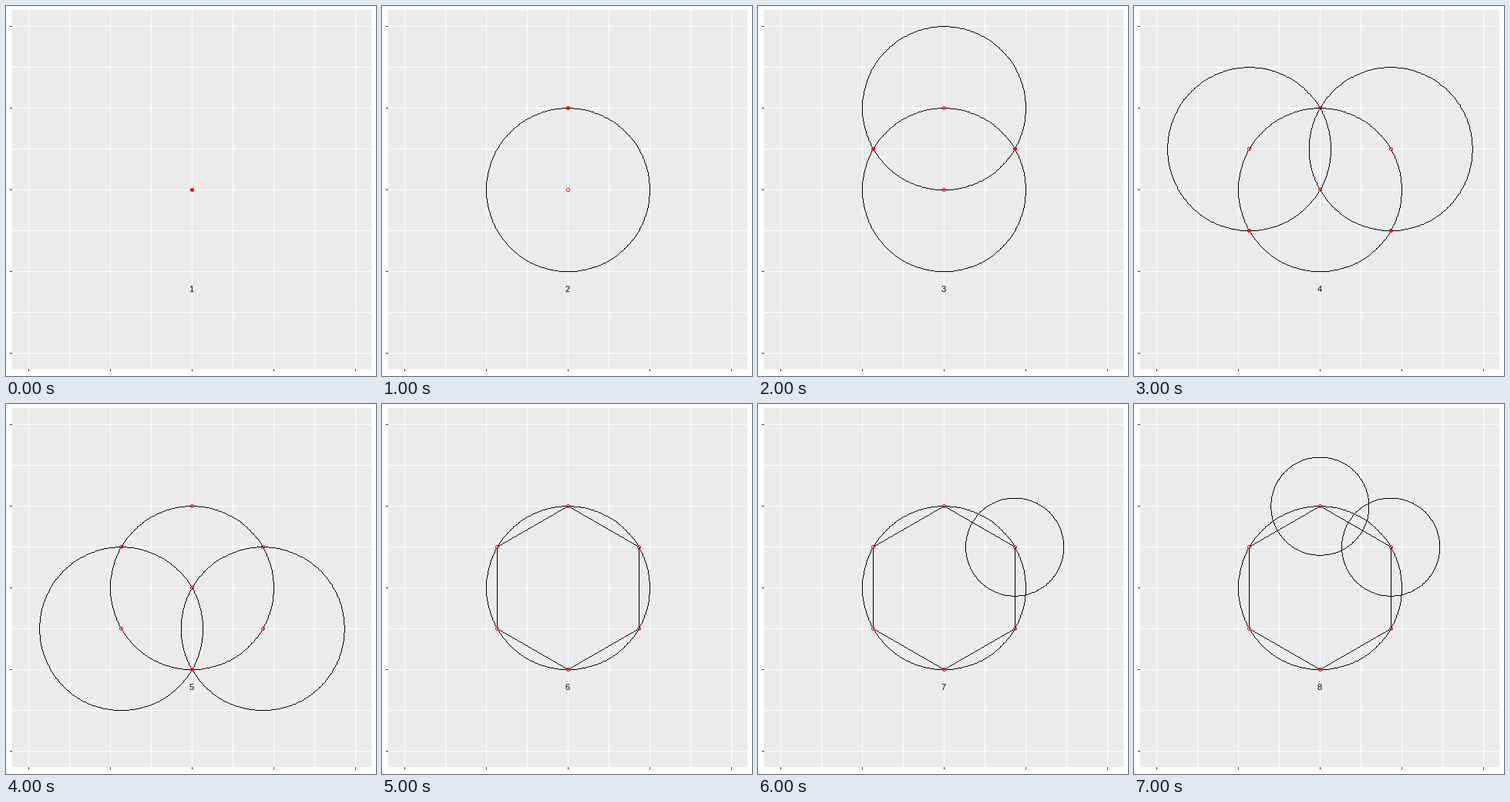
A matplotlib script that plays this animation: 480x480 px, repeating every 8 s.

```python
import numpy as np
import matplotlib.pyplot as plt
from matplotlib.animation import ArtistAnimation
from matplotlib.collections import PolyCollection
from matplotlib.patches import Rectangle

SIZE, DPI = 480, 80
PX = 72 / DPI                       # one pixel in points
LEFT, TOP, RIGHT, BOTTOM = 8, 5, 474, 471
CX, CY, UNIT = 241.375, 238.625, 466.25 / 4.4

fig = plt.figure(figsize=(SIZE / DPI, SIZE / DPI), dpi=DPI, facecolor="white")
ax = fig.add_axes([0, 0, 1, 1])
ax.set_xlim(0, SIZE)
ax.set_ylim(SIZE, 0)
ax.axis("off")


def pixel(p):
    """Pixels (column, row) that hold points given in plot units."""
    return np.floor(np.array([CX, CY]) + UNIT * np.asarray(p) * [1, -1])


def bar(x, y, w, h, color):
    ax.add_patch(Rectangle((x, y), w, h, fc=color, lw=0, antialiased=False))


def background():
    bar(LEFT, TOP, RIGHT - LEFT, BOTTOM - TOP, "#ebebeb")
    for v in np.arange(-2, 2.5, 0.5):
        x, y = pixel((v, v))
        bar(x, TOP, 1, BOTTOM - TOP, "white")
        bar(LEFT, y, RIGHT - LEFT, 1, "white")
        if v == int(v):
            bar(x, BOTTOM, 1, 3, "#333333")
            bar(LEFT - 3, y, 3, 1, "#333333")


def paint(cells, color, zorder):
    """Fill single pixels, so that strokes stay sharp and one pixel wide."""
    square = np.array([(0, 0), (1, 0), (1, 1), (0, 1)])
    squares = np.unique(cells, axis=0)[:, None] + square
    return ax.add_collection(
        PolyCollection(squares, facecolors=color, edgecolors="none",
                       linewidths=0, antialiaseds=False, zorder=zorder),
        autolim=False)


def segment(a, b):
    steps = int(max(np.abs(b - a).max(), 1))
    t = np.arange(steps + 1)[:, None] / steps
    return np.floor(a + (b - a) * t + 0.5)


def outline(points):
    p = pixel(points)
    return paint(np.vstack([segment(a, b) for a, b in zip(p, p[1:])]),
                 "black", 3)


def circle(centre, radius):
    t = np.linspace(0, 2 * np.pi, 361)
    return outline(np.array(centre)
                   + radius * np.column_stack([np.cos(t), np.sin(t)]))


GRID = np.array([(x, y) for x in range(-2, 3) for y in range(-2, 3)])
REACH = np.hypot(*GRID.T)


def dot(p):
    return paint(pixel(p) + GRID[REACH < 2.5], "red", 4)


def ring(p):
    return paint(pixel(p) + GRID[(REACH > 1.5) & (REACH < 2.5)], "red", 4)


def label(n):
    return ax.text(240.4, 371, str(n), ha="center", va="baseline",
                   family="Liberation Sans", fontsize=11 * PX, color="black",
                   zorder=5)


O = (0, 0)
# hexagon corners, clockwise from the top
CORNERS = [(np.sin(a), np.cos(a)) for a in np.arange(6) * np.pi / 3]
N, NE, SE, S, SW, NW = CORNERS

# each step: circles as (centre, radius), open points, solid points, hexagon?
base = (O, 1)
first, second = (NE, 0.6), (N, 0.6)
STEPS = [
    ([], [], [O], False),
    ([base], [O], [N], False),
    ([base, (N, 1)], [O, N], [NW, NE], False),
    ([base, (NW, 1), (NE, 1)], [O, N, NW, NE], [SW, SE], False),
    ([base, (SW, 1), (SE, 1)], [O, N, NW, NE, SW, SE], [S], False),
    ([base], CORNERS, [], True),
    ([base, first], CORNERS, [], True),
    ([base, first, second], CORNERS, [], True),
]


def build(n, step):
    circles, opened, solid, hexagon = step
    artists = [circle(c, r) for c, r in circles]
    if hexagon:
        artists.append(outline(CORNERS + [N]))
    artists += [ring(p) for p in opened] + [dot(p) for p in solid]
    return artists + [label(n)]


background()
scenes = [build(n, step) for n, step in enumerate(STEPS, 1)]
anim = ArtistAnimation(fig, scenes, interval=1000, repeat=True, repeat_delay=0)
plt.show()
```
